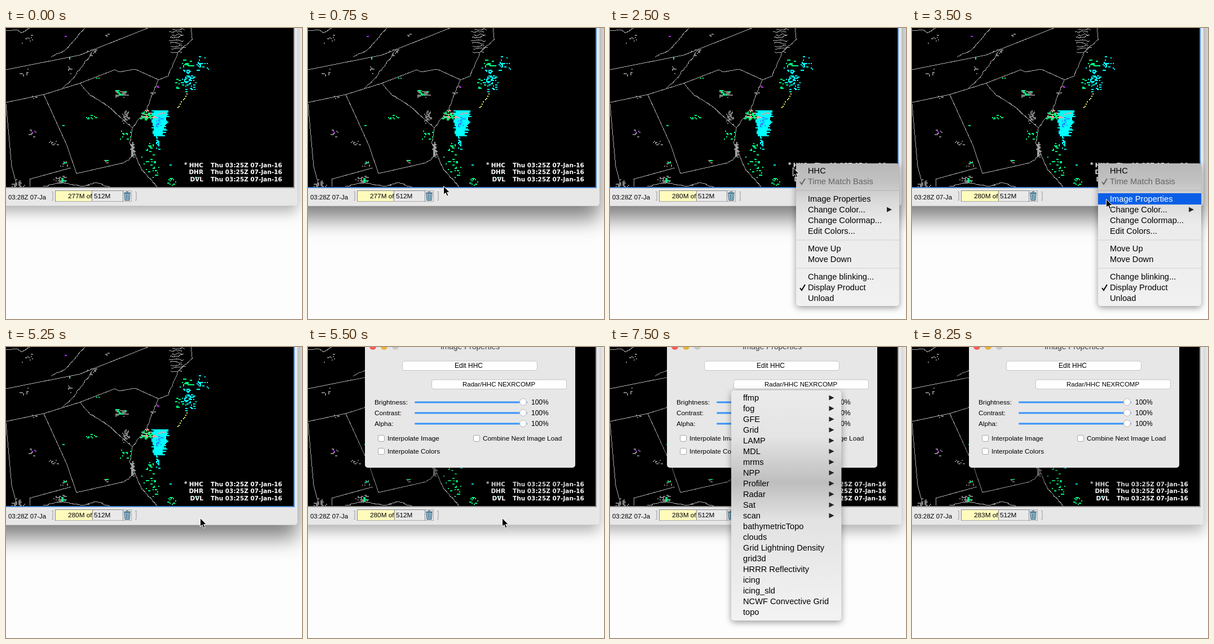
An HTML page that plays this animation: 525x516 px, repeating every 8.75 s.

```html
<!DOCTYPE html>
<html lang="en">
<head>
<meta charset="utf-8">
<title>Image properties</title>
<style>
html, body { margin: 0; width: 100%; height: 100%; overflow: hidden; background: #fdfdfd; }
svg { display: block; width: 525px; height: 516px; font: 11.8px "Liberation Sans", Arial, sans-serif; }
.frame { filter: drop-shadow(0 10px 12px rgba(0,0,0,.3)); }
.active .frame { filter: drop-shadow(0 22px 18px rgba(0,0,0,.5)); }
.rim { fill: #000; stroke: #989898; stroke-width: 2; }
.active .rim { stroke: #4a8ad6; }
.line { fill: none; stroke: #aaa; shape-rendering: crispEdges; }
.echo { shape-rendering: crispEdges; }
.legend { font: bold 10.5px "DejaVu Sans", sans-serif; fill: #fff; }
.menu { font-size: 14.65px; }
.menu > rect:first-child { filter: drop-shadow(0 3px 6px rgba(0,0,0,.4)); }
.panel { filter: drop-shadow(0 20px 18px rgba(0,0,0,.55)); }
.button { fill: #fff; stroke: #c4c4c4; }
.tick { fill: none; stroke: #000; stroke-width: 2; }
.off text { fill: #666; }
.off .tick { stroke: #666; }
.picked .highlight { fill: #0b5fe6; }
.picked text { fill: #fff; }
.hidden { display: none; }
</style>
</head>
<body>
<svg id="stage" viewBox="0 0 525 516">
  <defs>
    <linearGradient id="glassA" x2="0" y2="1">
      <stop stop-color="#b8b8b8"/><stop offset=".13" stop-color="#c2c2c2"/><stop offset=".27" stop-color="#dadada"/>
      <stop offset=".42" stop-color="#ebebeb"/><stop offset="1" stop-color="#f1f1f1"/>
    </linearGradient>
    <linearGradient id="glassB" x2="0" y2="1">
      <stop stop-color="#ebebeb"/><stop offset=".2" stop-color="#e4e4e4"/><stop offset=".4" stop-color="#bebebe"/>
      <stop offset=".56" stop-color="#e2e2e2"/><stop offset="1" stop-color="#f3f3f3"/>
    </linearGradient>
    <clipPath id="mapClip"><rect width="510" height="282"/></clipPath>
  </defs>

  <rect class="frame" x="-80" y="-80" width="597" height="396" rx="6" fill="#e7e7e7"/>
  <path d="M0 315.500H512" stroke="#c6c6c6"/>
  <rect class="rim" x="-5" y="-5" width="516" height="288"/>
  <g id="map" clip-path="url(#mapClip)"></g>
  <g class="legend" id="legend"><text x="316" y="246">*</text></g>

  <text x="4" y="304" font-size="11.4">03:28Z 07-Ja</text>
  <path d="M81 290.500h2v15h-2M229 290.500h2v15h-2" fill="none" stroke="#999"/>
  <rect x="87.500" y="288.500" width="135" height="19" fill="#e9e9e9" stroke="#aaa"/>
  <rect id="used" x="88" y="289" height="18" fill="#fffbbd"/>
  <path id="usedEdge" stroke="#888"/>
  <path d="M87.500 308V288.500H207.500V308" fill="none" stroke="#888"/>
  <text id="memory" x="110" y="302"></text>
  <path d="M210 293.500h10l-1 12h-8z" fill="#9cc8d8" stroke="#25506e"/>
  <path d="M209 292h12M213 290.500h4M213.500 295v9M216.500 295v9" fill="none" stroke="#25506e"/>

  <g id="dialog">
    <rect class="panel" x="101" y="-20" width="373" height="234" rx="5" fill="#e7e7e7"/>
    <circle cx="115" cy="-1" r="6" fill="#fc5b57"/><circle cx="135" cy="-1" r="6" fill="#e5b43c"/><circle cx="155" cy="-1" r="6" fill="#c9c9c9"/>
    <text x="287.500" y="4" font-size="13.8" text-anchor="middle" fill="#444">Image Properties</text>
    <rect class="button" x="167.500" y="25" width="239" height="16.500" rx="3.500"/>
    <text x="260" y="37" font-size="12">Edit HHC</text>
    <rect class="button" x="219.500" y="58" width="239" height="16.500" rx="3.500"/>
    <text x="274" y="70" font-size="11.5">Radar/HHC NEXRCOMP</text>
  </g>
  <g id="productMenu" class="menu"><rect x="330" y="240" width="183" height="253" rx="5" fill="url(#glassA)"/></g>
  <g id="colormapMenu" class="menu"><rect x="215" y="77" width="195.500" height="408" rx="5" fill="url(#glassB)"/></g>
  <path id="cursor" d="M.5.5V15.500L4 12.300 6.500 18 9 17 6.600 11.400H11.400Z" stroke="#fff"/>
</svg>

<script>
const $ = id => document.getElementById(id);

function add(parent, tag, attrs, text = '') {
  const node = document.createElementNS('http://www.w3.org/2000/svg', tag);
  for (const key in attrs) node.setAttribute(key, attrs[key]);
  node.textContent = text;
  return parent.appendChild(node);
}

let seed = 29;
function random() {
  seed = (seed * 1664525 + 1013904223) >>> 0;
  return seed / 4294967296;
}
const spread = () => random() + random() - 1;
const pairs = text => text.split(' ').map(pair => pair.split(',').map(Number));

// Joins key points; a jitter above zero turns straight runs into a ragged coast.
function line(text, jitter = 0) {
  const points = pairs(text);
  let d = 'M' + points[0];
  points.slice(1).forEach(([x, y], i) => {
    const [x0, y0] = points[i];
    const steps = jitter ? Math.ceil(Math.hypot(x - x0, y - y0) / 4) : 1;
    for (let k = 1; k <= steps; k++) {
      const wobble = k < steps ? jitter : 0, at = k / steps;
      d += `L${x0 + (x - x0) * at + spread() * wobble} ${y0 + (y - y0) * at + spread() * wobble}`;
    }
  });
  add($('map'), 'path', { class: 'line', d });
}

// State borders
line('0,74 131,48 252,0');
line('0,132 67,118 131,98 193,74 201,78 229,73 271,92');
line('67,118 108,208 125,258 209,239');
line('0,135 10,245 18,275');
line('42,281 42,268 115,248');
// Rivers, ridges and coasts
line('0,5 20,3 28,9 42,0', 1);
line('80,52 107,37 124,18 140,0', 1.5);
line('100,107 118,90 137,65 157,38', 1.5);
line('131,98 148,118 180,138 224,177', 1);
line('209,239 215,235 224,228', 2);
line('328,0 331,20 305,43 288,85 270,92 250,143 224,178 220,205 240,250 268,282', 1);
line('66,281 95,274 136,281 160,274 184,282', 1.5);
for (let y = 2; y < 46; y += 5) line(`${292 + spread() * 5},${y} ${314 + spread() * 5},${y + spread() * 5}`, 3);

const block = (x, y, width = 2) => `M${2 * Math.round(x / 2)} ${2 * Math.round(y / 2)}h${width}v2h-${width}z`;
const paint = (fill, d) => add($('map'), 'path', { class: 'echo', fill, d });

// Ragged clusters of short runs, thinning outward from each place.
function echo(fill, places, rx, ry, count) {
  let d = '';
  for (const [x, y] of pairs(places))
    for (let i = 0; i < count; i++)
      d += block(x + spread() * rx, y + spread() * ry, random() < .35 ? 4 : 2);
  paint(fill, d);
}

const GRAY = '#7c7c7c', GREEN = '#00ff80', CYAN = '#00ffff';
echo(GRAY, '38,20 32,78 112,70 152,42 46,186 83,202 102,240', 11, 11, 9);
echo(GRAY, '180,12 50,121 178,236 144,277 258,115', 5, 3, 4);
echo(GRAY, '202,116 95,269 20,276', 14, 9, 34);
echo(GRAY, '211,154', 7, 17, 34);
echo('#a0a0a0', '223,214', 4, 17, 34);
echo(GREEN, '202,114 95,270 150,155', 10, 7, 9);
echo(GREEN, '162,88 178,234 103,238 112,52 102,171', 3, 2, 2);
echo(GREEN, '212,189 256,212 252,238 262,251 293,272 307,97', 13, 13, 11);
echo(GREEN, '320,63', 10, 8, 22);
echo(GREEN, '252,156', 15, 8, 60);
echo(CYAN, '322,84 325,98 345,62', 14, 16, 30);
echo(CYAN, '290,241 337,264', 2, 2, 2);
echo(CYAN, '267,202', 6, 20, 16);

// Storm core: broad at the top, narrowing and fraying downward.
let core = '';
for (let y = 146; y < 192; y += 2) {
  const left = 258 + random() * 5, right = 295 - (y - 146) * .25 - random() * 8;
  core += block(left, y, 2 * Math.round((right - left) / 2));
}
paint(CYAN, core);
echo('#2090ff', '272,165', 10, 10, 16);
echo('#ff9a94', '251,147 262,159 246,156 275,151', 6, 4, 5);
echo('#c020ff', '46,184 268,104 104,14', 3, 2, 3);

let trail = '';
for (let k = 0; k < 8; k++) trail += block(320 - k * 2.3, 116 + k * 3.5);
paint('#e8f060', trail);

['HHC', 'DHR', 'DVL'].forEach((name, i) => {
  const y = 246.5 + i * 12.7;
  add($('legend'), 'text', { x: 350, y, 'text-anchor': 'end' }, name);
  add($('legend'), 'text', { x: 363, y }, 'Thu 03:25Z 07-Jan-16');
});

['Brightness:', 'Contrast:', 'Alpha:'].forEach((label, i) => {
  const y = 98 + 19 * i, dialog = $('dialog');
  add(dialog, 'text', { x: 118, y: y + 4 }, label);
  add(dialog, 'rect', { x: 189, y: y - 1.5, width: 200, height: 3, rx: 1.5, fill: '#3794fa' });
  add(dialog, 'circle', { cx: 381.5, cy: y - .5, r: 6, fill: '#fff', stroke: '#b5b5b5' });
  add(dialog, 'text', { x: 396, y: y + 4, 'font-size': 12 }, '100%');
});

['Interpolate Image', 'Combine Next Image Load', 'Interpolate Colors'].forEach((label, i) => {
  const x = 124 + 169 * (i % 2), y = 156 + 23 * (i >> 1);
  add($('dialog'), 'rect', { x: x + .5, y: y + .5, width: 11, height: 11, rx: 2.5, fill: '#fff', stroke: '#a8a8a8' });
  add($('dialog'), 'text', { x: x + 17, y: y + 10 }, label);
});

// Item prefixes: "-" separator, "+" ticked; suffix ">" opens a submenu.
function fillMenu(menu, top, items) {
  const box = menu.firstElementChild;
  const x = +box.getAttribute('x'), width = +box.getAttribute('width');
  let y = top;
  for (const entry of items) {
    if (entry === '-') {
      add(menu, 'path', { d: `M${x} ${y - 3}h${width}`, stroke: '#000', opacity: .12 });
      y += 12;
      continue;
    }
    const row = add(menu, 'g', {});
    add(row, 'rect', { class: 'highlight', x, y: y - 10, width, height: 20, fill: 'none' });
    if (entry[0] === '+') add(row, 'path', { class: 'tick', d: `M${x + 7} ${y + 1}l3 4 6-10` });
    if (entry.endsWith('>')) add(row, 'path', { d: `M${x + width - 22} ${y - 4.5}l9 4.5-9 4.5z`, fill: '#222' });
    add(row, 'text', { x: x + 21, y: y + 5 }, entry.replace(/^\+|>$/g, ''));
    y += 19;
  }
  return [...menu.querySelectorAll('g')];
}

const rows = fillMenu($('productMenu'), 253, ['HHC', '+Time Match Basis', '-', 'Image Properties', 'Change Color...>',
  'Change Colormap...', 'Edit Colors...', '-', 'Move Up', 'Move Down', '-', 'Change blinking...', '+Display Product', 'Unload']);
const chosenRow = rows[2];
rows[1].setAttribute('class', 'off');

fillMenu($('colormapMenu'), 90, ['ffmp>', 'fog>', 'GFE>', 'Grid>', 'LAMP>', 'MDL>', 'mrms>', 'NPP>', 'Profiler>', 'Radar>',
  'Sat>', 'scan>', 'bathymetricTopo', 'clouds', 'Grid Lightning Density', 'grid3d', 'HRRR Reflectivity', 'icing',
  'icing_sld', 'NCWF Convective Grid', 'topo']);

const LOOP = 8750, STEP = 250;

// The pointer hops one waypoint per step, then rests.
const moves = [
  [250, pairs('250,397 229,401 240,280 251,264 301,244 315,244 324,247')],
  [3000, pairs('337,275 345,290 344,303')],
  [6000, pairs('332,144 309,88 307,72')]
];
function pointer(time) {
  const move = moves.filter(([start]) => start <= time).pop();
  if (!move || time >= 7250) return null;
  const [start, stops] = move;
  return stops[Math.min(stops.length - 1, Math.floor((time - start) / STEP))];
}

function toggle(node, name, on) {
  node.classList.toggle(name, on);
}

function render() {
  const time = performance.now() % LOOP;
  const during = (from, to) => time >= from && time < to;
  toggle($('stage'), 'active', during(750, 5500));
  toggle($('productMenu'), 'hidden', !during(2250, 5250));
  toggle(chosenRow, 'picked', during(3500, 5250));
  toggle($('dialog'), 'hidden', !during(5500, LOOP));
  toggle($('colormapMenu'), 'hidden', !during(6750, 8000));

  const spot = pointer(time);
  toggle($('cursor'), 'hidden', !spot);
  if (spot) $('cursor').setAttribute('transform', `translate(${spot})`);

  const memory = time < 1000 ? 277 : time < 2000 ? 279 : time < 6000 ? 280 : 283;
  const used = Math.round(memory / 512 * 118);
  $('memory').textContent = memory + 'M of 512M';
  $('used').setAttribute('width', used);
  $('usedEdge').setAttribute('d', `M${88.5 + used} 289v18`);
  requestAnimationFrame(render);
}
render();
</script>
</body>
</html>
```
